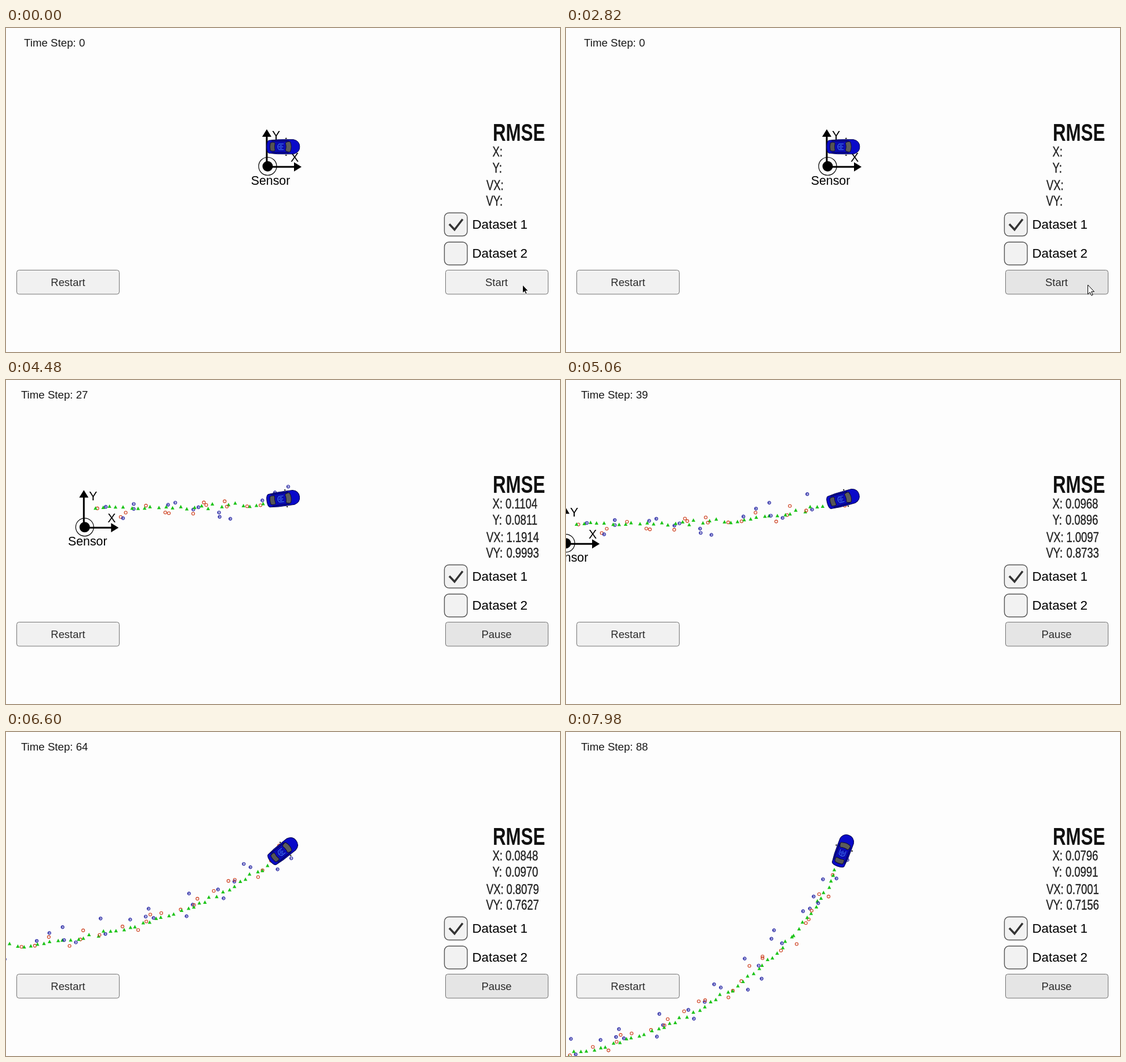
These frames come from a looping animation (956 px wide and 560 px high, 8 s). An HTML page:

```html
<!DOCTYPE html>
<html lang="en">
<head>
<meta charset="utf-8">
<title>Tracking simulator</title>
<style>
  html, body { margin: 0; width: 100%; height: 100%; overflow: hidden; background: #fdfdfd; }
  svg { display: block; width: 956px; height: 560px; font-family: "Liberation Sans", Arial, sans-serif; }
  .mid { text-anchor: middle; }
  .ui { font-size: 18.4px; fill: #2c2c2c; }
  #clock { font-size: 18.7px; fill: #181818; }
  .button { fill: #f1f1f1; stroke: #757575; }
  .button.hot { fill: #e5e5e5; }
  .box { fill: #f2f2f2; stroke: #555; stroke-width: 1.4; }
  .option { font-size: 22.3px; }
  .rmse { font-size: 23.6px; fill: #222; stroke: #222; stroke-width: .4; }
  .laser { fill: none; stroke: #cc3a18; stroke-width: 1.1; }
  .radar { fill: none; stroke: #1c1ca0; stroke-width: 1.2; }
  .estimate { fill: #1ec41a; }
</style>
</head>
<body>
<svg viewBox="0 0 956 560">
  <g id="world">
    <g font-size="21.3">
      <path d="M450 239V186M451 240H499" stroke="#000" stroke-width="3"/>
      <path d="M450 175l8 13h-16zM510 240l-13 8v-16z"/>
      <circle cx="451.5" cy="239" r="15.5" fill="none" stroke="#000" stroke-width="1.2"/>
      <circle cx="451.5" cy="239" r="9"/>
      <text class="mid" x="466" y="193">Y</text>
      <text class="mid" x="498" y="231">X</text>
      <text class="mid" x="456.5" y="271">Sensor</text>
    </g>
    <g id="marks"></g>
  </g>

  <g id="car">
    <path d="M4-14l2-1M4 14l2 1" stroke="#111" stroke-width="2"/>
    <path d="M-25-11Q-10-13 5-12.5L18-12.5Q28.5-10 28.5 0Q28.5 10 18 12.5L5 12.5Q-10 13-25 11Q-28.5 9-28.5 0Q-28.5-9-25-11Z" fill="#0909c9" stroke="#04044e"/>
    <path d="M-20-10H10M-20 10H10" stroke="#05056e" stroke-width="2"/>
    <path d="M-22-7Q-17-8.5-14-7Q-15.5 0-14 7Q-17 8.5-22 7Q-24 0-22-7Z" fill="#555" stroke="#101030"/>
    <path d="M4-7Q8-9.5 12-9Q16 0 12 9Q8 9.5 4 7Q6 0 4-7Z" fill="#5c5c5c" stroke="#101030"/>
    <path d="M-12-8H2V8H-12Z" fill="#0b0ba8"/>
    <path d="M1-5H-7Q-12 0-7 5H1M0 0H-8M-2-2.5H-6M-2 2.5H-6" fill="none" stroke="#3d6cf0" stroke-width="1.2"/>
  </g>

  <text id="clock" class="mid" x="83.7" y="31.5"></text>
  <text transform="translate(840 194.7) scale(.72 1)" font-size="43.4" font-weight="bold" fill="#111">RMSE</text>
  <g id="errors"></g>

  <rect class="box" x="756.5" y="319.5" width="39.5" height="40" rx="8"/>
  <path d="M765 339l9 9.500L788 330.500" fill="none" stroke="#333" stroke-width="3.5"/>
  <text class="option" x="804.5" y="347">Dataset 1</text>
  <rect class="box" x="756.5" y="370" width="39.5" height="39.5" rx="8"/>
  <text class="option" x="804.5" y="397">Dataset 2</text>

  <rect class="button" x="18.5" y="418.5" width="177" height="41.5" rx="4"/>
  <text class="mid ui" x="107" y="446">Restart</text>
  <rect id="run" class="button" x="758.5" y="418.5" width="177" height="41.5" rx="4"/>
  <text id="runLabel" class="mid ui" x="846.5" y="446"></text>
  <path id="cursor" d="M0 0V16L3.600 12.700L6.200 18.300L8.600 17.200L6.100 11.700H11Z"/>
</svg>
<script>
const LOOP = 8000, LAST_STEP = 88, START_TICK = 62;
const CAR = { x: 478, y: 205 };
const $ = id => document.getElementById(id);

// The simulation runs unevenly: [display tick, time step].
const PACE = [[START_TICK, 0], [82, 16], [109, 39], [130, 52], [153, 75], [171, LAST_STEP]];

function stepAt(tick) {
  const next = PACE.findIndex(key => tick <= key[0]);
  if (next === 0) return 0;
  const [n0, s0] = PACE[next - 1], [n1, s1] = PACE[next];
  return Math.floor(s0 + (s1 - s0) * (tick - n0) / (n1 - n0) + 1e-6);
}

// The car turns ever more to the left while slowing a little.
const headingAt = step => 69.6 * (step / LAST_STEP) ** 1.84;
const route = [{ ...CAR }];
for (let k = 1; k <= LAST_STEP; k++) {
  const mid = k - .5, speed = 11.75 - .00014 * mid * mid;
  const angle = headingAt(mid) * Math.PI / 180, from = route[k - 1];
  route.push({ x: from.x + speed * Math.cos(angle), y: from.y - speed * Math.sin(angle) });
}

// Position and velocity errors settle as the filter converges.
const ERRORS = [
  { label: "X:", x: 839.5, y: 222, left: 862, at: k => .066 + 1.2 / k },
  { label: "Y:", x: 839.5, y: 250, left: 862, at: k => .1 - .073 * Math.exp(-k / 20) },
  { label: "VX:", x: 829, y: 280, left: 863.5, at: k => 5.25 * k ** -.45 },
  { label: "VY:", x: 828.5, y: 307, left: 863.5, at: k => .59 + 11.05 / k }
];

function add(parent, tag, attrs) {
  const node = document.createElementNS("http://www.w3.org/2000/svg", tag);
  for (const name in attrs) node.setAttribute(name, attrs[name]);
  return parent.appendChild(node);
}

let seed = 7;
const random = () => (seed = seed * 16807 % 2147483647) / 2147483647;
const noise = spread => (random() + random() + random() - 1.5) * 2 * spread;

const RING = "M-2.500 0a2.500 2.500 0 1 0 5 0a2.500 2.500 0 1 0-5 0";
const SHAPES = { laser: RING, radar: RING + "h3.500", estimate: "M0-3.200L3.200 2.800H-3.200Z" };
const marks = [];

function mark(step, kind, dx, dy, spread) {
  const x = route[step].x + dx + noise(spread), y = route[step].y + dy + noise(spread);
  const node = add($("marks"), "path", { class: kind, d: SHAPES[kind], transform: `translate(${x} ${y})` });
  marks.push({ step, node });
}

// Laser and radar readings alternate; the estimate follows each step.
for (let k = 0; k <= LAST_STEP; k++) {
  if (k % 2) mark(k, "radar", 0, 0, 14);
  else mark(k, "laser", 0, 2, 8);
  mark(k, "estimate", -9 * Math.exp(-k / 10), 4 * Math.min(1, k / 30), 1.6);
}

for (const row of ERRORS) {
  const text = x => add($("errors"), "text", { class: "rmse", transform: `translate(${x} ${row.y}) scale(.78 1)` });
  text(row.x).textContent = row.label;
  row.node = text(row.left);
}

function drawCursor(t) {
  const glide = (from, to) => Math.min(1, Math.max(0, (t - from) / (to - from)));
  const white = t >= 1200;
  const x = 891.5 + 9 * glide(400, 800) + 58 * glide(3340, 3640);
  const cursor = $("cursor");
  cursor.setAttribute("transform", `translate(${x} 444) scale(${white ? 1 : .88})`);
  cursor.setAttribute("fill", white ? "#fff" : "#000");
  cursor.setAttribute("stroke", white ? "#000" : "#fff");
  cursor.style.display = t < 3640 ? "" : "none";
}

function draw(t) {
  // The display refreshes in an uneven 20, 100, 20 ms rhythm.
  const phase = t % 140;
  const tick = 3 * Math.floor(t / 140) + (phase >= 120 ? 2 : phase >= 20 ? 1 : 0);
  const step = stepAt(tick), car = route[step];

  $("world").setAttribute("transform", `translate(${CAR.x - car.x} ${CAR.y - car.y})`);
  $("car").setAttribute("transform", `translate(${CAR.x + .3} ${CAR.y + .3}) rotate(${-headingAt(step)})`);
  for (const m of marks) m.node.style.display = step > 0 && m.step <= step ? "" : "none";

  $("clock").textContent = "Time Step: " + step;
  for (const row of ERRORS) row.node.textContent = step ? row.at(step).toFixed(4) : "";
  $("runLabel").textContent = tick < START_TICK ? "Start" : "Pause";
  $("run").classList.toggle("hot", t >= 1200);
  drawCursor(t);
}

const began = performance.now();
function frame() {
  draw((performance.now() - began) % LOOP);
  requestAnimationFrame(frame);
}
frame();
</script>
</body>
</html>
```
